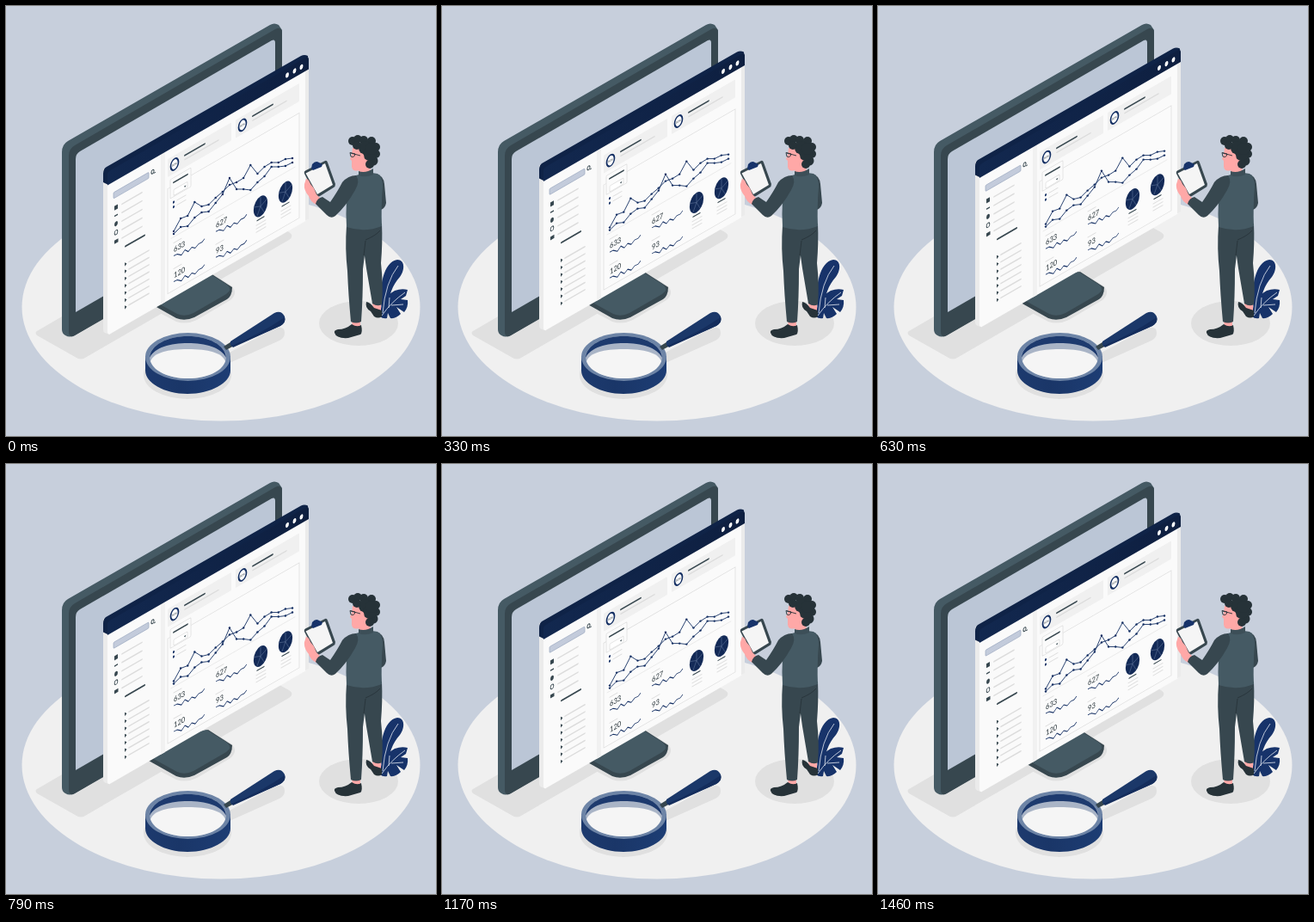
Write an HTML page that moves like this. It is 500 px wide and 500 px high and loops after 1500 ms.

```html
<!DOCTYPE html>
<html lang="en">
<head>
<meta charset="utf-8">
<title>Dashboard review</title>
<style>
  html, body { margin: 0; width: 100%; height: 100%; overflow: hidden; background: #c7cfdc; }
  svg { display: block; width: 100%; height: 100%; }
  text { font-family: Lato, sans-serif; fill: #263238; }
</style>
</head>
<body>
<svg viewBox="0 0 500 500">
  <defs>
    <linearGradient id="bar" x2="1" y2="0"><stop stop-color="#12284f"/><stop offset="1" stop-color="#0e1f40"/></linearGradient>
    <linearGradient id="rim" x2="1" y2="0"><stop stop-color="#1d3a6e"/><stop offset=".4" stop-color="#1a3668"/><stop offset="1" stop-color="#1d3d74"/></linearGradient>
  </defs>

  <!-- Floor and shadows -->
  <ellipse cx="250" cy="350" rx="231.5" ry="132.5" fill="#f0f0f0"/>
  <g fill="#e0e0e0">
    <path d="M36 378 L280 236 L329 263 Q336 267 329 272 L92 409 Q87 412 82 409 L36 383 Q33 380 36 378Z"/>
    <path d="M160 347 L198 367 Q210 371 222 365 L261 342 Q270 334 263 326 L235 308Z"/>
    <ellipse cx="410" cy="369" rx="46" ry="26"/>
    <ellipse cx="211" cy="429" rx="51" ry="28"/>
    <path d="M256 405 L312 375 Q324 371 324 380 Q324 386 318 389 L260 415Z"/>
  </g>

  <!-- Monitor -->
  <path d="M65 170 Q65 161 72 157 L307 22 Q312 19 317 22 L321 28 V240 L80 383 Q74 386 69 383 Q65 381 65 376Z" fill="#455a64"/>
  <path d="M73 174 Q73 166 80 162 L313 27 Q321 23 321 32 V245 L80 383 Q73 387 73 378Z" fill="#37474f"/>
  <path d="M81 178 Q81 172 86 169 L309 40 Q313 38 313 43 V222 L81 356Z" fill="#bbc6d6"/>
  <path d="M150 336 L198 363 Q208 367 219 362 L257 341 Q263 337 263 327 L235 309Z" fill="#37474f"/>
  <path d="M150 331 L199 358 Q208 362 218 357 L256 335 Q264 330 257 324 L233 309Z" fill="#455a64"/>

  <g id="window">
    <path d="M113 190 L120 186 L121 382 L115 380 Q113 379 113 376Z" fill="#ebebeb"/>
    <path d="M113 195 Q113 189 117 187 L343 58 Q347 56 351 58 L352 74 L119 208 L113 205Z" fill="#0f2347"/>
    <g id="face" transform="matrix(1 -.577 0 1 118 193)"></g>
    <g id="chart" fill="#142f63"></g>
  </g>

  <!-- Magnifying glass -->
  <path d="M162 407 V424 C162 438 184 451 211 451 S261 438 261 424 V407Z" fill="url(#rim)"/>
  <ellipse cx="211.500" cy="408" rx="49.500" ry="28" fill="#6d84a6"/>
  <ellipse cx="211.500" cy="408.500" rx="44.500" ry="24.500" fill="#a9b4c6"/>
  <path d="M167 409 C168 394 188 384 211.500 384 S255 394 256 409 C250 397 232 392 211.500 392 S173 397 167 409Z" fill="#1d3a6e"/>
  <path d="M168 413 C172 403 188 399 211.500 399 S251 403 255 413 C251 425 234 433 211.500 433 S172 425 168 413Z" fill="#f5f5f5"/>
  <path d="M253 396 L264 389 L267 394 L256 400Z" fill="#37474f"/>
  <path d="M261 390 L312 357 Q320 353 324 361 Q326 368 319 372 L264 396 Q260 396 261 390Z" fill="#1b3869"/>
  <path d="M262 395 Q295 382 324 362 Q326 368 319 372 L264 397Z" fill="#142d5c"/>

  <!-- Plant -->
  <g fill="#17336a">
    <path d="M437 352 C433 328 439 297 455 295 C464 295 464 307 458 315 C449 325 446 335 442 355Z"/>
    <path d="M435 361 C435 347 442 336 452 331 Q460 328 467 330 L465 337 L459 341 L467 342 Q468 350 463 356 L454 350 L459 358 Q453 364 447 363 L444 357 L443 363 Q438 364 435 361Z"/>
    <path d="M438 357 Q441 321 456 302 M437 360 Q448 344 464 333 M445 351 L446 339 M448 348 L462 347" fill="none" stroke="#e4e9f2" stroke-width=".8"/>
  </g>

  <!-- Person -->
  <path d="M426 344 H436 V357 H427Z" fill="#ffa8a7"/>
  <path d="M419 344 Q424 345 428 351 L437 354 V361 Q433 364 428 361 L424 355 Q417 351 419 344Z" fill="#263238"/>
  <path d="M402 364 H412 V377 H403Z" fill="#ffa8a7"/>
  <path d="M382 380 Q381 377 386 376 Q395 376 402 370 Q408 374 413 371 Q415 380 412 382 L398 386 Q384 387 382 380Z" fill="#263238"/>
  <path d="M412 255 L437 253 Q438 275 436 299 Q439 326 437 347 Q432 350 426 346 L419 305Z" fill="#37474f"/>
  <path d="M396 255 L437 253 Q437 262 419 272 Q417 290 415 306 Q415 340 413 367 Q407 370 401 367 Q398 335 397 308 Q394 282 396 255Z" fill="#37474f"/>
  <path d="M418 272 Q430 267 435 261 M418 273 L416 290" fill="none" stroke="#263238" stroke-width=".8"/>
  <path d="M430 195 Q439 197 440 207 L442 229 Q441 235 436 237 L431 235Z" fill="#37474f"/>
  <path d="M403 165 L421 164 L424 194 L411 196 L410 191 Q403 193 402 187 L402 180 L400 178 L402 173Z" fill="#ffa8a7"/>
  <path d="M407 197 Q419 192 432 195 Q438 198 438 210 Q436 235 437 256 Q417 264 396 257 Q395 242 396 225 Q398 201 407 197Z" fill="#455a64"/>
  <path d="M410 192 Q418 195 427 189 V196 Q418 200 410 197Z" fill="#3d4f58"/>
  <g fill="#263238" id="hair"></g>
  <ellipse cx="413" cy="176" rx="3.500" ry="4.800" fill="#ffa8a7"/>
  <path d="M400 170.500 L401 175 Q405 177 406 172Z M401 171 L412 174" fill="none" stroke="#263238" stroke-width=".9"/>
  <path d="M347 195 Q346 192 349 191 L371 180 Q373 179 374 182 L383 207 Q383 210 381 211 L365 221 Q362 223 360 220Z" fill="#37474f"/>
  <path d="M348.500 194.500 L371 183 L380 208 L362 219Z" fill="#f5f5f5"/>
  <path d="M355 189 L356 184 Q360 179 364 182 L368 184 L367 187 L357 191Z" fill="#17336a"/>
  <path d="M349 201 Q352 201 354 207 L358 212 L361 219 L367 225 L361 231 Q354 228 352 221 Q346 214 347 207Z" fill="#ffa8a7"/>
  <path d="M407 197 Q412 204 406 214 Q396 232 383 244 Q378 248 373 243 L360 230 Q362 223 368 222 L377 228 Q386 215 391 205 Q398 197 407 197Z" fill="#37474f"/>
</svg>
<script>
const byId = id => document.getElementById(id);
const NAVY = '#142f63', DARK = '#37474f', PALE = '#dcdcdc';

const rect = (x, y, w, h, fill, extra = '') =>
  `<rect x="${x}" y="${y}" width="${w}" height="${h}" fill="${fill}" ${extra}/>`;
const bar = (x, y, w, color = PALE, size = 1.6) =>
  `<path d="M${x} ${y}h${w}" stroke="${color}" stroke-width="${size}" stroke-linecap="round"/>`;
const disc = (x, y, r, fill, extra = '') =>
  `<ellipse cx="${x}" cy="${y}" rx="${r * .7}" ry="${r}" fill="${fill}" ${extra}/>`;
const label = (x, y, size, text) =>
  `<text transform="translate(${x} ${y}) scale(.866 1)" font-size="${size}">${text}</text>`;
const outline = 'stroke="#dedede" stroke-width=".8"';

function header() {
  return '<path d="M0 14V3Q0 0 4 0H230Q234 0 234 4V15.500H0Z" fill="url(#bar)"/>' +
    [209, 217.5, 225.5].map(x => disc(x, 8, 2.8, '#fff')).join('');
}

function sidebar() {
  let s = rect(7, 28, 41, 7, '#c3cbdb', 'rx="1" stroke="#9aa7bf" stroke-width=".6"');
  s += disc(52.5, 30, 2.2, 'none', `stroke="${DARK}"`) + bar(54, 32.5, 1.5, DARK, 1);
  const icons = [
    rect(8, 44.5, 4, 5, DARK), rect(8, 55.5, 4, 1.5, DARK), disc(10, 66, 2.8, DARK),
    disc(10, 76, 2.6, 'none', `stroke="${DARK}" stroke-width=".9"`), rect(8, 84.5, 4.5, 4, DARK)
  ];
  icons.forEach((icon, i) => s += icon + bar(17, 47 + i * 9.9, 23));
  s += bar(21, 98.5, 22, DARK, 2);
  for (let i = 0; i < 7; i++) {
    const y = 119 + i * 8.35;
    s += `<path d="M20 ${y - 2.2}l2.500 2.600-2.500 1.800z" fill="${DARK}"/>` + bar(25, y, 23);
  }
  return s;
}

function card(x) {
  return rect(x, 25.5, 74, 21, '#f0f0f0', 'rx="1"') +
    disc(x + 8, 36, 6.4, '#fff', `stroke="${NAVY}" stroke-width="1.700"`) +
    label(x + 5, 37.2, 3.4, '80%') +
    bar(x + 20, 32.5, 23, DARK, 1.8) + bar(x + 20, 37.5, 39, PALE, 1.5);
}

function stat(x, y, value) {
  return bar(x, y - 15, 9, PALE, 1) + label(x, y - 4, 8.8, value) +
    `<path d="M${x} ${y}l4 .3 5 3.9 4-3.700 4 4.300 4-2.700 4 3.300 4-2.700 4 .3 3-2.200" fill="none" stroke="${NAVY}" stroke-width=".9"/>`;
}

function pie(x) {
  const y = 142.6;
  return disc(x, y, 11.6, '#132a57') +
    `<path d="M${x} ${y}V${y - 11}M${x} ${y}l7-4M${x} ${y}l-7-3M${x} ${y}l-4 9M${x} ${y}l4 9" stroke="#62769c" stroke-width=".5"/>` +
    bar(x - 4, 157, 8, DARK, 1.2) + [162, 166, 170].map(v => bar(x - 5, v, 11, PALE, 1)).join('');
}

function content() {
  let s = card(70) + card(149);
  s += rect(70, 60, 153, 122, '#fbfbfb', outline);
  s += rect(73, 51, 24, 22, '#fbfbfb', outline + ' rx="1"') + bar(77, 56.5, 16, DARK, 1.8);
  s += rect(77, 65, 16, 7, '#fff', outline + ' rx="1"') + `<path d="M89 68h2.400l-1.200 2z" fill="${DARK}"/>`;
  s += [79.5, 85].map(y => disc(77, y, 1.5, NAVY) + bar(81, y, 10, PALE, 1)).join('');
  s += bar(74, 120, 144, '#e6e6e6', .7);
  s += stat(77, 142, 633) + stat(126, 142, 627) + stat(77, 172, 120) + stat(126, 172, 93);
  return s + pie(178) + pie(207);
}

byId('face').innerHTML =
  '<path d="M0 14H234V187Q234 190 230 190H4Q0 190 0 186Z" fill="#fafafa"/>' +
  rect(62, 15.5, 5, 174.5, '#f1f1f1') + rect(230, 15.5, 4, 174, '#ebebeb') +
  header() + sidebar() + content();

const series = [
  [262, 247, 244, 228, 233, 231, 223, 216, 208, 205, 200, 185, 195, 187, 182, 182, 178, 177],
  [265, 257, 256, 246, 240, 239, 229, 219, 200, 213, 213, 214, 205, 198, 187, 187, 186, 182]
];
byId('chart').innerHTML = series.map(values => {
  const points = values.map((y, i) => [195 + i * 8.12, y]);
  return `<polyline points="${points}" fill="none" stroke="${NAVY}" stroke-width=".9"/>` +
    points.map(([x, y]) => `<circle cx="${x}" cy="${y}" r="1.200"/>`).join('');
}).join('');

const curls = [[403, 157, 5], [409, 154.5, 4.5], [416, 156, 5], [425, 157, 5], [430, 164, 5], [430, 172, 5],
  [427, 180, 5.5], [423, 184, 5], [418, 165, 8], [423, 172, 8], [408, 162, 5], [425, 166, 7]];
byId('hair').innerHTML = curls.map(([x, y, r]) => `<circle cx="${x}" cy="${y}" r="${r}"/>`).join('');

// The window floats up 10 units and back at constant speed.
const PERIOD = 1500, LIFT = 10;
const start = performance.now();
function draw(now) {
  const phase = Math.max(0, now - start) % PERIOD / PERIOD;
  const y = -LIFT * (1 - Math.abs(1 - 2 * phase));
  byId('window').setAttribute('transform', `translate(0 ${y})`);
  requestAnimationFrame(draw);
}
draw(start);
</script>
</body>
</html>
```
